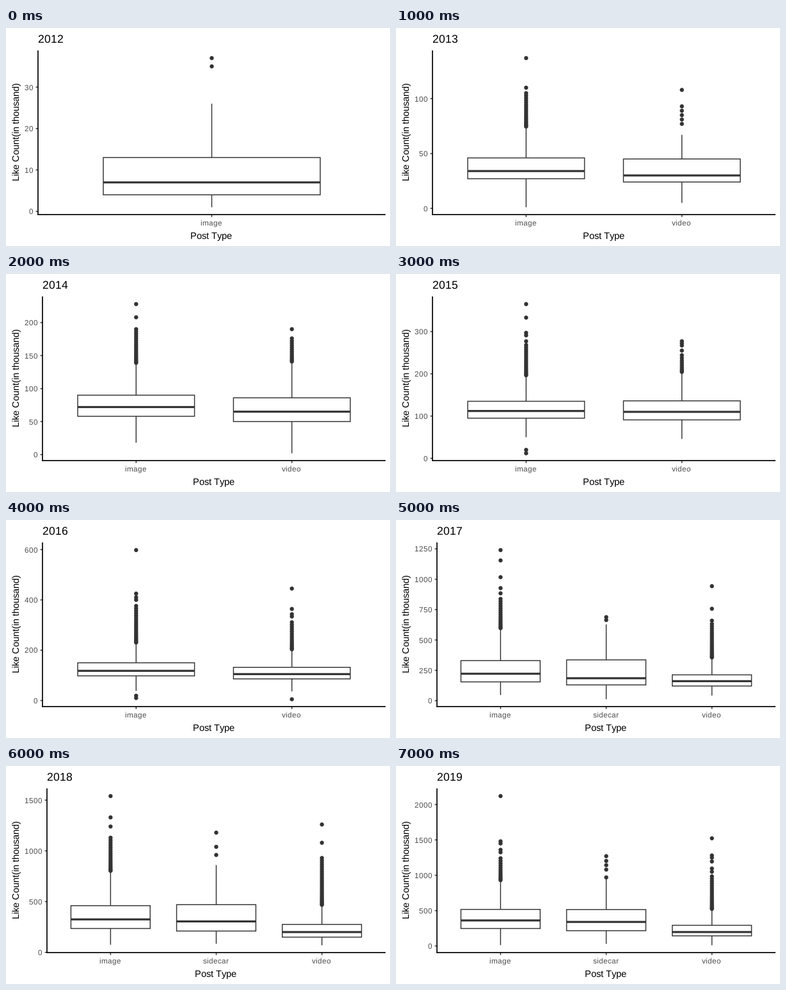
A matplotlib script that plays this animation: 600 by 340 pixels, repeating every 8 s.

```python
import math

import matplotlib.pyplot as plt
from matplotlib.animation import FuncAnimation
from matplotlib.patches import Circle, PathPatch, Rectangle
from matplotlib.path import Path
from matplotlib.textpath import TextPath
from matplotlib.transforms import Affine2D

W, H, DPI = 600, 340, 100
PT = 72 / DPI                       # points per pixel
TOP, BOTTOM, RIGHT = 35.3, 291.2, 592.67
PAD = (BOTTOM - TOP) / 22           # 5% of the data range on both sides
LINE, TICK, DOT = 1.45, 3.67, 3.2
DARK, GREY = "#333333", "#4d4d4d"
FONT = {"family": "Liberation Sans"}
FIRST_YEAR = 2012
TYPES = {1: ["image"], 2: ["image", "video"], 3: ["image", "sidecar", "video"]}


class Box:
    """Quartiles, lone outliers and the crest of the crowded ones.

    The upper whisker ends at the usual 1.5 IQR fence unless given."""

    def __init__(self, low, q1, mid, q3, crest=0, far=(), high=None):
        self.low, self.q1, self.mid, self.q3 = low, q1, mid, q3
        self.high = high or math.floor(q3 + 1.5 * (q3 - q1))
        self.crest, self.far = crest, far

    def ends(self):
        return [self.low, self.high, *self.far]

    def outliers(self, scale):
        """Lone dots, then a column that thins out towards its crest."""
        n = int((self.crest - self.high) * scale / 2.8)
        start = self.high + 1 / scale
        column = [start + (self.crest - start) * (k / (n - 1)) ** 1.25
                  for k in range(n)]
        return [*self.far, *column]


# axis step and boxes, one row per year
YEARS = [
    (10, [Box(1, 4, 7, 13, far=(35, 37))]),
    (50, [Box(1, 27, 34, 46, 105, (137, 110)),
          Box(5, 24, 30, 45, far=(108, *range(77, 96, 4)), high=67)]),
    (50, [Box(18, 58, 72, 90, 190, (228, 208)),
          Box(2, 50, 65, 86, 176, (190,))]),
    (100, [Box(50, 95, 112, 135, 268, (365, 333, 297, 291, 277, 20, 12)),
           Box(46, 91, 110, 136, 244, (277, 272, 267, 255))]),
    (200, [Box(38, 98, 118, 150, 376, (598, 425, 410, 400, 19, 10)),
           Box(36, 86, 105, 132, 311, (445, 364, 343, 334, 5))]),
    (250, [Box(47, 155, 222, 330, 838, (1240, 1155, 1017, 927, 884)),
           Box(12, 130, 185, 336, far=(688, 664), high=628),
           Box(43, 121, 161, 213, 632, (943, 757, 659))]),
    (500, [Box(75, 235, 325, 460, 1130, (1540, 1330, 1240)),
           Box(85, 210, 305, 470, far=(1180, 1040, 960)),
           Box(70, 150, 200, 275, 930, (1260, 1080))]),
    (500, [Box(12, 247, 361, 517, 1240, (2120, 1480, 1450, 1360, 1325)),
           Box(30, 216, 340, 515, far=(1270, 1203, 1143, 1080, 970)),
           Box(10, 143, 197, 292, 985, (1523, 1280, 1250, 1195, 1095, 1050))]),
]

fig = plt.figure(figsize=(W / DPI, H / DPI), dpi=DPI, facecolor="white")
ax = fig.add_axes([0, 0, 1, 1])


def glyphs(s, size):
    """Outline of a string with whole-pixel advances, and its width."""
    def extent(t):
        return TextPath((0, 0), t, size=size, prop=FONT).get_extents().width

    pen, parts = 0, []
    for c in s:
        if c != " ":
            path = TextPath((0, 0), c, size=size, prop=FONT)
            parts.append(path.transformed(Affine2D().translate(pen, 0)))
        pen += round(extent("H" + c + "H") - extent("HH"))
    return Path.make_compound_path(*parts), pen


def text(x, y, s, size, color="black", align=0.0, upright=False):
    """Text whose origin sits on a whole pixel."""
    path, width = glyphs(s, size)
    move = Affine2D().scale(1, -1)
    if upright:
        move = move.rotate_deg(-90)
        y += align * width
    else:
        x -= align * width
    move = move.translate(math.floor(x), math.floor(y))
    ax.add_patch(PathPatch(path.transformed(move), fc=color, lw=0, zorder=5))


def line(x0, y0, x1, y1, color=DARK, width=LINE, z=2, snap=False):
    ax.plot([x0, x1], [y0, y1], color=color, lw=width * PT, zorder=z,
            solid_capstyle="butt", snap=snap)


def draw_box(x, half, box, to_y, scale):
    low, q1, mid, q3, high = map(
        to_y, (box.low, box.q1, box.mid, box.q3, box.high))
    for v in box.outliers(scale):
        ax.add_patch(Circle((x, to_y(v)), DOT, fc=DARK, lw=0, zorder=2))
    line(x, q3, x, high)
    line(x, q1, x, low)
    ax.add_patch(Rectangle((x - half, q3), 2 * half, q1 - q3, fc="white",
                           ec=DARK, lw=LINE * PT, zorder=3, snap=False))
    line(x - half, mid, x + half, mid, width=2.2 * LINE, z=4)


def draw(i):
    ax.clear()
    ax.set(xlim=(0, W), ylim=(H, 0))
    ax.axis("off")
    step, boxes = YEARS[i]

    ends = [v for box in boxes for v in box.ends()]
    vmin, vmax = min(ends), max(ends)
    scale = (BOTTOM - TOP - 2 * PAD) / (vmax - vmin)

    def to_y(v):
        return BOTTOM - PAD - (v - vmin) * scale

    ticks = [v for v in range(0, 2 * vmax, step) if to_y(v) > TOP]
    left = 36.3 + 7 * len(str(ticks[-1]))
    for v in ticks:
        y = to_y(v)
        line(left - TICK, y, left, y)
        text(left - 6.6, y + 4.9, str(v), 11.73, GREY, 1)

    unit = (RIGHT - left) / (len(boxes) + 0.2)
    for k, (name, box) in enumerate(zip(TYPES[len(boxes)], boxes)):
        x = left + (k + 0.6) * unit
        draw_box(x, 0.375 * unit, box, to_y, scale)
        line(x, BOTTOM, x, BOTTOM + TICK)
        text(x, 308, name, 11.73, GREY, 0.5)

    line(left, TOP, left, BOTTOM, "black", 1.7, 4, True)
    line(left - 1, BOTTOM, RIGHT, BOTTOM, "black", 1.7, 4, True)
    text(left, 23, str(FIRST_YEAR + i), 17.6)
    text((left + RIGHT) / 2, 329, "Post Type", 14.67, align=0.5)
    text(20, (TOP + BOTTOM) / 2, "Like Count(in thousand)", 14.67,
         align=0.5, upright=True)
    return []


anim = FuncAnimation(fig, draw, frames=len(YEARS), interval=1000,
                     init_func=lambda: draw(0), repeat=True)
plt.show()
```
